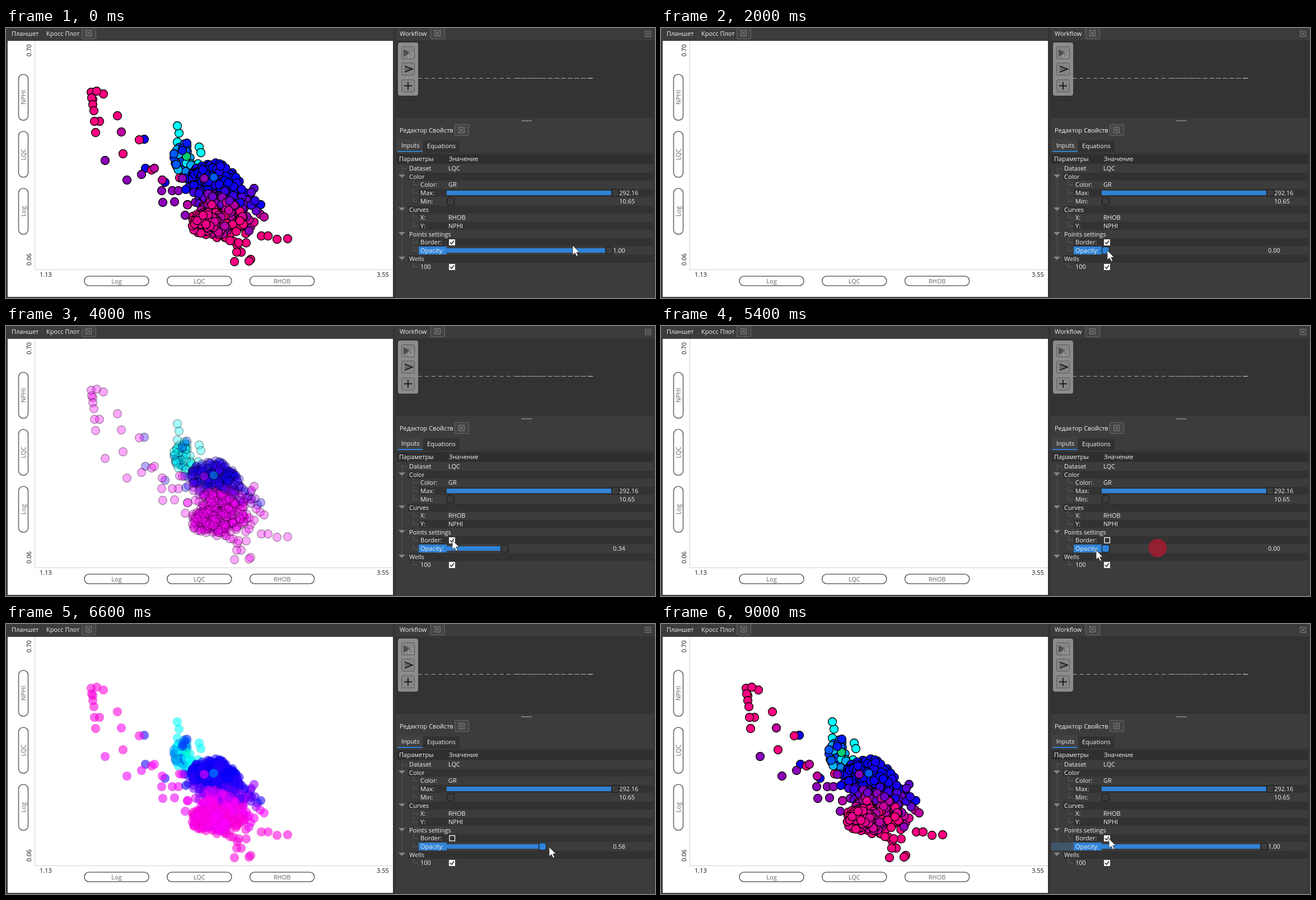
These frames come from a looping animation (1159x483 px, 9.8 s). An HTML page with a canvas:

```html
<!DOCTYPE html>
<html lang="ru">
<head>
<meta charset="utf-8">
<title>Кросс Плот</title>
<style>
  html, body { margin: 0; width: 100%; height: 100%; overflow: hidden; background: #3c3c3c; }
  canvas { display: block; width: 1159px; height: 483px; }
</style>
</head>
<body>
<canvas id="stage" width="1159" height="483"></canvas>
<script>
const ctx = document.getElementById('stage').getContext('2d');
const LOOP = 9800, STEP = 200, LAST = 9000;
const FONT = '11px "Open Sans", "Noto Sans", sans-serif';
const BLUE = '#2f83d8', LIGHT = '#f2f2f2', PANEL = '#3c3c3c', DARK = '#323232';
const TAU = Math.PI * 2;

// ---------- timeline ----------
// [ms, x, y]
const cursorKeys = [
  [0, 1012, 389], [200, 1030, 402], [400, 1066, 418], [600, 1077, 399], [800, 1074, 398],
  [1400, 872, 398], [2000, 797, 398], [2400, 799, 398], [3000, 868, 398], [3600, 880, 398],
  [3800, 842, 391], [4000, 797, 383], [4400, 798, 384], [4800, 879, 397], [5000, 887, 397],
  [5400, 777, 401], [5600, 778, 401], [6000, 852, 400], [6600, 970, 399], [7000, 1090, 398],
  [7200, 1099, 396], [7400, 881, 383], [7600, 815, 382], [8000, 797, 383], [9000, 800, 384]
];
// [ms, opacity]
const opacityKeys = [
  [0, 1], [800, 1], [1400, 0.3], [2000, 0], [2400, 0.02], [3000, 0.27], [3600, 0.34],
  [5000, 0.34], [5400, 0], [5600, 0], [6000, 0.17], [6600, 0.58], [7000, 1], [9000, 1]
];
// [ms, x, y]
const clicks = [[600, 1077, 398], [4200, 798, 384], [5200, 887, 397], [8600, 799, 384]];

function at(keys, t) {
  let i = 1;
  while (i < keys.length - 1 && keys[i][0] < t) i++;
  const a = keys[i - 1], b = keys[i];
  const k = Math.min(1, Math.max(0, (t - a[0]) / (b[0] - a[0])));
  return a.slice(1).map((v, n) => v + (b[n + 1] - v) * k);
}
const within = (t, a, b) => t >= a && t < b;

// ---------- data points ----------
let seed = 20;
function rnd() {
  seed = (seed * 1664525 + 1013904223) % 4294967296;
  return seed / 4294967296;
}
const gauss = () => Math.sqrt(-2 * Math.log(rnd() + 1e-9)) * Math.cos(TAU * rnd());

// -2 green, -1 cyan, 0 blue, 1 pink
function ramp(v) {
  v = Math.max(-2, Math.min(1, v));
  if (v >= 0) return [255 * v, 0, 255 - 127 * v];
  if (v >= -1) return [0, -255 * v, 255];
  return [0, 255 + 55 * (v + 1), 255 + 155 * (v + 1)];
}

const points = [];
const add = (x, y, v) => points.push({ x, y, rgb: ramp(v) });
function addAll(v, xy) {
  for (let i = 0; i < xy.length; i += 2) add(xy[i], xy[i + 1], v);
}

function shape(xy) {
  const p = new Path2D();
  for (let i = 0; i < xy.length; i += 2) p.lineTo(xy[i], xy[i + 1]);
  p.closePath();
  return p;
}

function scatter(n, area, cx, cy, sx, sy, value) {
  while (n > 0) {
    const x = cx + gauss() * sx, y = cy + gauss() * sy;
    if (!ctx.isPointInPath(area, x, y)) continue;
    add(x, y, value(x, y));
    n--;
  }
}

addAll(0.05, [247, 199, 249, 251, 284, 276, 449, 320, 455, 316]);
addAll(1, [152, 115, 174, 118, 162, 113, 155, 128, 153, 125, 155, 137, 157, 148, 167, 167, 158, 167,
  160, 187, 199, 157, 238, 200, 209, 225, 260, 254, 456, 372, 468, 372, 484, 378, 503, 377,
  413, 389, 420, 401, 412, 401, 408, 418, 437, 414, 434, 417]);
addAll(0.75, [206, 186, 265, 251, 279, 272, 454, 333, 461, 338]);
addAll(0.55, [177, 237, 216, 272, 242, 262, 278, 291, 280, 312, 301, 311, 297, 291, 308, 291, 320, 335]);
addAll(-1, [309, 188, 306, 175, 345, 213, 348, 223, 306, 204, 343, 243]);
add(310, 268, 0.95);

const neck = shape([299, 218, 306, 203, 322, 206, 330, 222, 332, 244, 342, 255, 322, 263, 306, 258, 298, 243]);
const body = shape([314, 267, 338, 251, 372, 238, 388, 243, 409, 262, 425, 285, 441, 300, 449, 318,
  446, 345, 438, 360, 432, 384, 412, 388, 385, 378, 336, 364, 331, 345, 323, 320, 322, 296]);
const corner = shape([332, 345, 345, 328, 380, 330, 400, 372, 384, 376, 333, 364]);

scatter(50, neck, 315, 230, 12, 20, () => rnd() < 0.12 ? -1.9 : -0.15 - 0.85 * rnd());
scatter(110, body, 368, 264, 26, 15, (x, y) => (y > 285 ? 0.2 : 0.02) + 0.06 * rnd());
scatter(400, body, 386, 312, 31, 38, (x, y) => {
  const v = (y - 282) / 52 - Math.max(0, x - 385) / 130 + 0.14 * gauss();
  return Math.max(rnd() * 0.1, v);
});
scatter(90, corner, 362, 348, 20, 14, x => 1 - Math.max(0, x - 350) / 180 - 0.12 * rnd());
addAll(0.35, [443, 287, 438, 294]);
addAll(0.55, [315, 269, 354, 269, 434, 363]);
addAll(-0.1, [323, 206, 315, 219]);
addAll(-0.35, [300, 225, 304, 244, 371, 267]);

function drawPoints(alpha, border) {
  if (alpha < 0.005) return;
  ctx.lineWidth = border ? 1.3 : 0.7;
  ctx.strokeStyle = `rgba(0,0,0,${border ? alpha : alpha * 0.2})`;
  for (const p of points) {
    const [r, g, b] = p.rgb.map(c => Math.min(255, Math.round(c / alpha)));
    ctx.fillStyle = `rgba(${r},${g},${b},${alpha})`;
    ctx.beginPath();
    ctx.arc(p.x, p.y, border ? 7.5 : 8, 0, TAU);
    ctx.fill();
    ctx.stroke();
  }
}

// ---------- drawing helpers ----------
function rect(x, y, w, h, fill) {
  ctx.fillStyle = fill;
  ctx.fillRect(x, y, w, h);
}
function round(x, y, w, h, r, fill, stroke, lw = 1) {
  ctx.beginPath();
  ctx.roundRect(x, y, w, h, r);
  if (fill) { ctx.fillStyle = fill; ctx.fill(); }
  if (stroke) { ctx.strokeStyle = stroke; ctx.lineWidth = lw; ctx.stroke(); }
}
function poly(xy, fill, stroke, lw = 1) {
  const p = shape(xy);
  if (fill) { ctx.fillStyle = fill; ctx.fill(p); }
  if (stroke) { ctx.strokeStyle = stroke; ctx.lineWidth = lw; ctx.stroke(p); }
}
function line(xy, color, lw = 1) {
  ctx.beginPath();
  for (let i = 0; i < xy.length; i += 2) ctx.lineTo(xy[i], xy[i + 1]);
  ctx.strokeStyle = color;
  ctx.lineWidth = lw;
  ctx.stroke();
}
function text(s, x, y, color = LIGHT, align = 'left') {
  ctx.font = FONT;
  ctx.textAlign = align;
  ctx.fillStyle = color;
  ctx.fillText(s, x, y + 4);
}
function upright(s, x, y, color) {
  ctx.save();
  ctx.translate(x, y);
  ctx.rotate(-Math.PI / 2);
  text(s, 0, 0, color, 'center');
  ctx.restore();
}

function floatIcon(x, y, color) {
  ctx.setLineDash([2, 1]);
  ctx.strokeStyle = color;
  ctx.lineWidth = 1;
  ctx.strokeRect(x - 4.5, y - 4.5, 10, 10);
  ctx.setLineDash([]);
  line([x - 2.5, y - 2.5, x + 3.5, y + 3.5], color);
  line([x + 3.5, y - 2.5, x - 2.5, y + 3.5], color);
}
function closeButton(x, y) {
  round(x + 0.5, y + 0.5, 25, 20, 1, '#454545', '#686868');
  floatIcon(x + 12, y + 10, '#a0a0a0');
}

function handle(x, y, active) {
  round(x - 6.5, y - 6.5, 13, 13, 3.5, active ? BLUE : '#3b3b3b', '#191919', 1.2);
}
function slider(x, y, active) {
  rect(787, y - 4, x - 787, 8, BLUE);
  handle(x, y, active);
}
function checkbox(y, on) {
  if (!on) {
    ctx.strokeStyle = '#f0f0f0';
    ctx.lineWidth = 1.4;
    ctx.strokeRect(792, y - 4.5, 9.5, 9.5);
    return;
  }
  rect(791, y - 5, 11, 11, '#f4f4f4');
  line([793, y + 0.5, 795.8, y + 3, 800, y - 2.5], '#333', 1.6);
}

// ---------- panels ----------
function drawPlot(alpha, border) {
  text('Планшет', 10, 10);
  text('Кросс Плот', 72, 10);
  closeButton(135, -1);
  rect(3, 23, 688, 458, '#fff');
  rect(51, 23, 1, 410, '#d2d2d2');
  rect(51, 432, 640, 1, '#d2d2d2');
  drawPoints(alpha, border);
  text('1.13', 60, 441, '#111');
  text('3.55', 662, 441, '#111');
  upright('0.70', 41, 40, '#111');
  upright('0.06', 41, 414, '#111');
  ['Log', 'LQC', 'RHOB'].forEach((s, i) => {
    const x = 140 + i * 147.8;
    round(x, 444, 115, 17, 8, '#fff', '#666', 1.6);
    text(s, x + 57.5, 452.5, '#666', 'center');
  });
  ['NPHI', 'LQC', 'Log'].forEach((s, i) => {
    const y = 83 + i * 102;
    round(22.5, y, 17, 82, 8, '#fff', '#666', 1.6);
    upright(s, 31, y + 41, '#666');
  });
}

function drawWorkflow() {
  text('Workflow', 703, 10);
  closeButton(758, -1);
  floatIcon(1146, 10, '#a0a0a0');
  rect(696, 22, 461, 139, '#343434');
  for (let x = 700; x < 1157; x += 10) rect(x, 22, 1, 139, '#303030');
  for (let y = 28; y < 161; y += 10) rect(696, y, 461, 1, '#303030');
  const dash = (x, w) => {
    rect(x, 91, w, 1, '#222');
    rect(x, 89.5, w, 1.2, '#a9a9a9');
  };
  for (let x = 699; x < 900; x += 12.2) dash(x, 6.5);
  for (let x = 907; x < 1040; x += 12) dash(x, x < 955 ? 11 : 9);
  dash(1039, 9);

  round(700, 26, 36, 95, 4, '#8c8c8c');
  for (const y of [33, 62, 92]) round(706.5, y + 0.5, 23, 22, 2, '#858585', '#5c5c5c');
  poly([710, 38, 710, 51, 723, 44.5], '#4d4d4d');
  ctx.setLineDash([1, 1]);
  ctx.strokeStyle = '#c4c4c4';
  ctx.strokeRect(718.5, 44.5, 8, 8);
  ctx.setLineDash([]);
  poly([712, 68, 726, 73.5, 712, 79], '#666');
  line([712, 68, 726, 73.5, 712, 79], '#111', 1.6);
  rect(711, 102.5, 14, 1.8, '#151515');
  rect(717, 96.5, 1.8, 14, '#151515');
  for (let x = 921; x < 938; x += 3) rect(x, 165, 2, 2, '#999');
}

const rows = [
  ['Dataset', 720, 'LQC'], ['Color', 720], ['Color:', 740, 'GR'], ['Max:', 740], ['Min:', 740],
  ['Curves', 720], ['X:', 740, 'RHOB'], ['Y:', 740, 'NPHI'], ['Points settings', 720],
  ['Border:', 740], ['Opacity:', 740], ['Wells', 720], ['100', 740]
];
const rowY = i => Math.round(251 + i * 14.7);

function drawEditor(alpha, border, dragging, hover) {
  text('Редактор Свойств', 703, 183);
  closeButton(801, 172);
  rect(745, 201, 65, 21, DARK);
  rect(699, 199, 45, 23, '#414141');
  rect(699, 220, 45, 2, BLUE);
  rect(696, 222, 461, 1, '#303030');
  text('Inputs', 706, 210);
  text('Equations', 752, 211);
  rect(697, 225, 459, 18, '#2f2f2f');
  text('Параметры', 702, 234);
  text('Значение', 791, 234);

  rect(707, 247, 1, 166, '#555');
  rows.forEach(([label, x, value], i) => {
    const y = rowY(i), child = x === 740;
    if (i % 2) rect(child ? 737 : 718, y - 7, 1156 - (child ? 737 : 718), 14, DARK);
    if (child) {
      rect(727, y - 8, 1, 9, '#5a5a5a');
      rect(727, y, 9, 1, '#5a5a5a');
    } else if (i) {
      poly([701, y - 4, 713, y - 4, 707, y + 2], '#858585');
    } else {
      rect(707, y, 9, 1, '#5a5a5a');
    }
    if (label === 'Opacity:') {
      if (hover) rect(697, y - 7, 40, 14, '#41566c');
      rect(737, y - 7, 50, 14, BLUE);
    }
    text(label, x, y);
    if (value) text(value, 790, y);
  });

  slider(1088, rowY(3));
  text('292.16', 1095, rowY(3));
  handle(794, rowY(4));
  text('10.65', 1095, rowY(4));
  checkbox(383, border);
  slider(794 + 283 * alpha, rowY(10), dragging);
  text(alpha.toFixed(2), 1084, rowY(10));
  checkbox(rowY(12), true);
}

function drawClick(t) {
  for (const [start, x, y] of clicks) {
    if (!within(t, start, start + 2 * STEP)) continue;
    ctx.beginPath();
    ctx.arc(x, y, 16.5, 0, TAU);
    ctx.fillStyle = 'rgba(185,20,45,0.7)';
    ctx.fill();
  }
}
function drawCursor(x, y) {
  poly([x, y, x, y + 17, x + 4, y + 13.4, x + 7, y + 19.5, x + 9.6, y + 18.2,
    x + 6.8, y + 12.3, x + 12, y + 12], '#fff', '#222', 0.8);
}

function draw(t) {
  const [alpha] = at(opacityKeys, t);
  const border = !within(t, 4200, 8600);
  const dragging = within(t, 600, 3600) || within(t, 5000, 7200);
  rect(0, 0, 1159, 483, PANEL);
  rect(691, 0, 5, 483, '#353535');
  rect(1157, 22, 2, 461, '#353535');
  drawPlot(alpha, border);
  drawWorkflow();
  drawEditor(alpha, border, dragging, t >= 8600);
  drawClick(t);
  drawCursor(...at(cursorKeys, t));
}

let shown = -1;
const begin = performance.now();
function tick() {
  const t = (performance.now() - begin) % LOOP;
  const step = Math.min(LAST, Math.floor(t / STEP) * STEP);
  if (step !== shown) draw(shown = step);
  requestAnimationFrame(tick);
}
tick();
</script>
</body>
</html>
```
